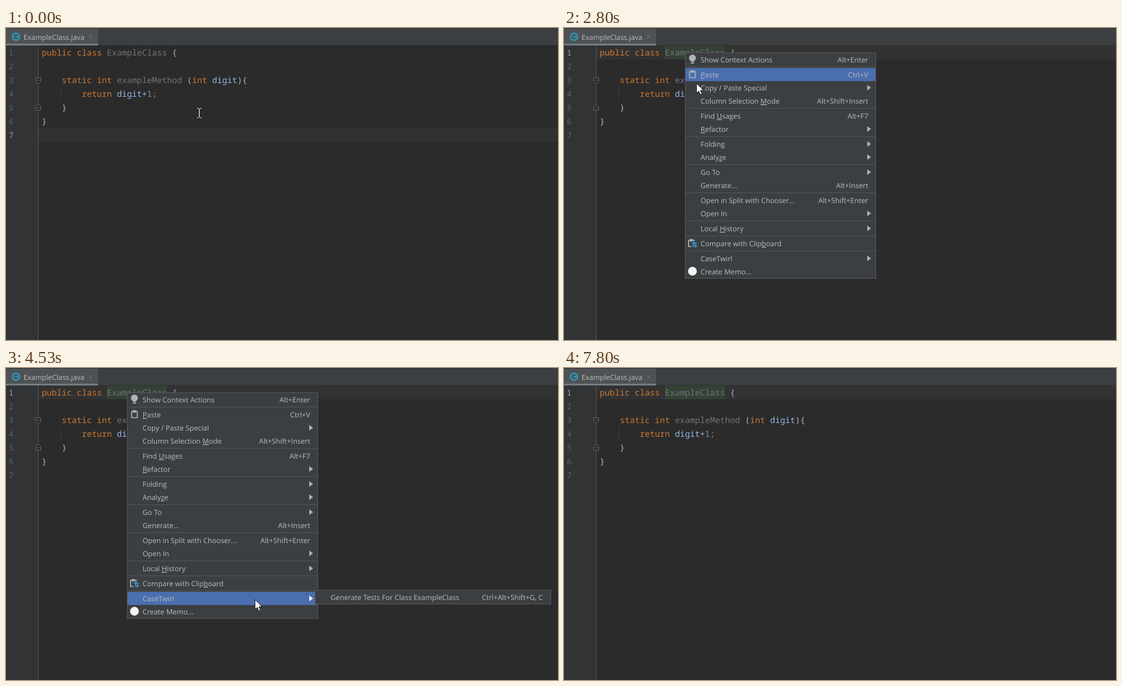
An HTML page that plays this animation: 881x499 px, repeating every 7870 ms.

```html
<!DOCTYPE html>
<html lang="en">
<head>
<meta charset="utf-8">
<title>Editor context menu</title>
<style>
  html, body { margin: 0; width: 100%; height: 100%; overflow: hidden; background: #2b2b2b; }
  svg { display: block; }
  rect { shape-rendering: crispEdges; }
  text { white-space: pre; text-rendering: geometricPrecision; }
  .code { font: 13.333px "Noto Sans Mono", "DejaVu Sans Mono", monospace; }
  .ui { font: 11.4px "Open Sans", "Noto Sans", sans-serif; fill: #bbbbbb; }
  .key { text-decoration: underline; }
</style>
</head>
<body>
<svg id="stage" width="881" height="499" viewBox="0 0 881 499"></svg>
<script>
const LOOP = 7870, STEP = 1000 / 15;
const stage = document.getElementById('stage');

function add(parent, tag, attrs = {}, content) {
  const node = document.createElementNS('http://www.w3.org/2000/svg', tag);
  for (const name in attrs) node.setAttribute(name, attrs[name]);
  if (content !== undefined) node.textContent = content;
  parent.append(node);
  return node;
}
const group = (parent = stage) => add(parent, 'g');
const box = (parent, x, y, width, height, fill) =>
  add(parent, 'rect', { x, y, width, height, fill });
const path = (parent, d, fill, stroke = 'none', width = 1) =>
  add(parent, 'path', { d, fill, stroke, 'stroke-width': width });
const show = (node, on) => node.setAttribute('display', on ? 'inline' : 'none');
const place = (node, [x, y]) => node.setAttribute('transform', `translate(${x} ${y})`);

// Editor background
box(stage, 0, 0, 881, 28, '#3c3f41');
box(stage, 0, 0, 881, 1, '#323232');
box(stage, 0, 27, 881, 1, '#323232');
box(stage, 0, 1, 147, 24, '#4e5254');
const tabLine = box(stage, 0, 25, 147, 3, '#747a80');
box(stage, 0, 28, 51, 471, '#313335');
const activeRow = box(stage, 52, 28, 829, 22, '#323232');
box(stage, 51, 28, 1, 471, '#555555');
const usage = box(stage, 161, 28, 96, 22, '#344134');
box(stage, 87, 94, 1, 22, '#3b3b3b');

// Tab
add(stage, 'circle', { cx: 16, cy: 14, r: 7, fill: '#3e86a0' });
path(stage, 'M18.3 12.2a2.8 2.8 0 1 0 0 3.6', 'none', '#263940', 1.3);
add(stage, 'text', { class: 'ui', x: 28, y: 19 }, 'ExampleClass.java');
path(stage, 'M132 11l6 6m0-6l-6 6', 'none', '#6e7173');

// Code: row, column, colour, text
const KEYWORD = '#cc7832', PLAIN = '#a9b7c6', UNUSED = '#72737a', PARAM = '#94b8e8';
[
  [1, 0, KEYWORD, 'public class'], [1, 13, UNUSED, 'ExampleClass'], [1, 26, PLAIN, '{'],
  [3, 4, KEYWORD, 'static int'], [3, 15, UNUSED, 'exampleMethod'], [3, 29, PLAIN, '('],
  [3, 30, KEYWORD, 'int'], [3, 34, PARAM, 'digit'], [3, 39, PLAIN, '){'],
  [4, 8, KEYWORD, 'return'], [4, 15, PARAM, 'digit'], [4, 20, PLAIN, '+'],
  [4, 21, '#6897bb', '1'], [4, 22, KEYWORD, ';'],
  [5, 4, PLAIN, '}'], [6, 0, PLAIN, '}']
].forEach(([row, col, fill, str]) =>
  add(stage, 'text', { class: 'code', x: 57 + col * 8, y: 22 + row * 22, fill }, str));

const numbers = [1, 2, 3, 4, 5, 6, 7].map(n =>
  add(stage, 'text', { class: 'code', x: 4.5, y: 22 + n * 22, style: 'font-size:12.5px' }, n));

path(stage, 'M47.5 79.5h8v6l-4 4-4-4zM49.5 83.5h4', '#2b2b2b', '#606366');
path(stage, 'M47.5 131.5h8v-6l-4-4-4 4zM49.5 127.5h4', '#2b2b2b', '#606366');
const caret = box(stage, 192, 30, 2, 18, '#bbbbbb');

// Context menu
const menu = group();
function panel(parent, x, y, w, h) {
  box(parent, x, y, w, h, '#555758');
  box(parent, x + 1, y + 1, w - 2, h - 2, '#3c3f41');
}
function label(parent, x, mid, str, shortcut, right) {
  const [before, after] = str.split('_');
  const text = add(parent, 'text', { class: 'ui', x, y: mid + 4.5 }, before);
  if (after) {
    add(text, 'tspan', { class: 'key' }, after[0]);
    add(text, 'tspan', {}, after.slice(1));
  }
  if (shortcut)
    add(parent, 'text', { class: 'ui', x: right, y: mid + 4.5, 'text-anchor': 'end' }, shortcut);
}

// '>' marks a submenu, '-' a separator
const ITEMS = [
  ['Show Context Actions', 'Alt+Enter'], '-',
  ['_Paste', 'Ctrl+V'], ['Copy / Paste Special', '>'],
  ['Column Selection _Mode', 'Alt+Shift+Insert'], '-',
  ['Find _Usages', 'Alt+F7'], ['_Refactor', '>'], '-',
  ['Folding', '>'], ['Analy_ze', '>'], '-',
  ['Go To', '>'], ['Generate...', 'Alt+Insert'], '-',
  ['Open in Split with Chooser...', 'Alt+Shift+Enter'], ['Open In', '>'], '-',
  ['Local _History', '>'], '-',
  ['Compare with Clip_board'], '-',
  ['CaseTwirl', '>'], ['Create Memo...']
];
panel(menu, 193, 39, 305, 362);
const rowMark = box(menu, 194, 64, 303, 21, '#4b6eaf');
const rows = [];
let rowTop = 40;
for (const item of ITEMS) {
  if (item === '-') {
    box(menu, 194, rowTop + 1, 303, 1, '#515355');
    rowTop += 3;
    continue;
  }
  const mid = rowTop + 10.5, [name, extra] = item;
  const sub = extra === '>';
  label(menu, 218, mid, name, sub ? '' : extra, 485.5);
  const tip = sub && path(menu, `M484 ${mid - 4.5}l6 4.5-6 4.5z`, '#afb1b3');
  rows.push({ top: rowTop, tip });
  rowTop += 21;
}

// Menu icons
path(menu, 'M202.5 54c0-2-3-3-3-6a5.5 5.5 0 0 1 11 0c0 3-3 4-3 6zM202.5 55h5v2h-5z', '#afb1b3');
const clipboard = (x, y) => {
  path(menu, `M${x} ${y}h9v10h-9z`, 'none', '#afb1b3', 1.6);
  path(menu, `M${x + 2} ${y - 2}h5v4h-5z`, '#afb1b3');
};
clipboard(200.5, 69.5);
clipboard(198.8, 339.5);
path(menu, 'M203 341h10v9h-10z', '#3c3f41');
path(menu, 'M208 340v3h4v2h-4v3l-4-4zM209 345v2h-4v2h4v3l4-3.5z', '#3592c4');
add(menu, 'circle', { cx: 205, cy: 389, r: 7, fill: '#f4f4f4' });

// Submenu
const submenu = group();
panel(submenu, 493, 355, 377, 23);
const subMark = box(submenu, 494, 356, 375, 21, '#4b6eaf');
label(submenu, 518, 366.5, 'Generate Tests For Class ExampleClass', 'Ctrl+Alt+Shift+G, C', 857);

// Pointers
const beam = group();
path(beam, 'M-3.5-7.5h3l.5 .5 .5-.5h3M0-7V7M-3.5 7.5h3l.5-.5 .5 .5h3', 'none', '#222222', 2.2);
path(beam, 'M-3-7.5H-.5M1.5-7.5H4M.5-7V7M-3 7.5H-.5M1.5 7.5H4', 'none', '#f0f0f0', 1.2);
const arrow = group();
path(arrow, 'M.5 .5V16.2l3.6-3.4 2.6 5.8 2.6-1.1-2.6-5.7h5z', '#ffffff', '#111111', 0.9);

// Pointer paths: step, x, y
const BEAM = [
  [0, 308, 136], [2, 297, 126], [4, 258, 92], [6, 212, 52], [8, 196, 40],
  [93, 196, 40], [94, 526, 365], [102, 526, 365], [104, 508, 374],
  [107, 410, 412], [110, 240, 464], [112, 140, 492], [113, 120, 520]
];
const ARROW = [
  [38, 196, 40], [40, 200, 52], [42, 211, 88], [46, 240, 205], [49, 262, 287],
  [50, 269, 297], [51, 275, 312], [54, 306, 338], [58, 366, 364], [61, 393, 369],
  [67, 393, 369], [68, 397, 370], [73, 446, 369], [77, 497, 365], [79, 510, 363],
  [82, 525, 364]
];
function along(keys, n) {
  const i = keys.findIndex(k => k[0] > n);
  if (i === 0) return keys[0].slice(1);
  if (i < 0) return keys[keys.length - 1].slice(1);
  const a = keys[i - 1], b = keys[i], f = (n - a[0]) / (b[0] - a[0]);
  return [1, 2].map(k => Math.round(a[k] + (b[k] - a[k]) * f));
}

function draw(n) {
  const clicked = n >= 22, menuOpen = n >= 29 && n < 94;
  const focused = (n >= 22 && n < 29) || (n >= 96 && n < 117);
  tabLine.setAttribute('fill', focused ? '#4a88c7' : '#747a80');
  activeRow.setAttribute('y', clicked ? 28 : 160);
  show(usage, clicked);
  show(caret, focused && !(n >= 104 && n < 111));
  numbers.forEach((num, i) =>
    num.setAttribute('fill', i === (clicked ? 0 : 6) ? '#a4a3a3' : '#606366'));

  // The highlight trails the pointer by one step
  const [hoverX, hoverY] = along(ARROW, n - 1);
  const hover = menuOpen && n >= 40 ? rows.filter(r => r.top <= hoverY).pop() : null;
  show(menu, menuOpen);
  show(rowMark, !!hover);
  if (hover) rowMark.setAttribute('y', hover.top);
  for (const row of rows)
    if (row.tip) row.tip.setAttribute('fill', row === hover ? '#ffffff' : '#afb1b3');
  // Keep the submenu's left edge and the parent row's arrow both visible
  const subOpen = menuOpen && n >= 61;
  show(submenu, subOpen);
  show(subMark, subOpen && hoverX >= 494);

  show(beam, !menuOpen && n < 113);
  place(beam, along(BEAM, n));
  show(arrow, menuOpen);
  place(arrow, along(ARROW, n));
}

const start = performance.now();
function tick() {
  const t = (performance.now() - start) % LOOP;
  let n = Math.floor((t + 4) / STEP);
  if (Math.round(n * STEP / 10) * 10 > t) n--;
  draw(Math.min(117, Math.max(0, n)));
  requestAnimationFrame(tick);
}
tick();
</script>
</body>
</html>
```
